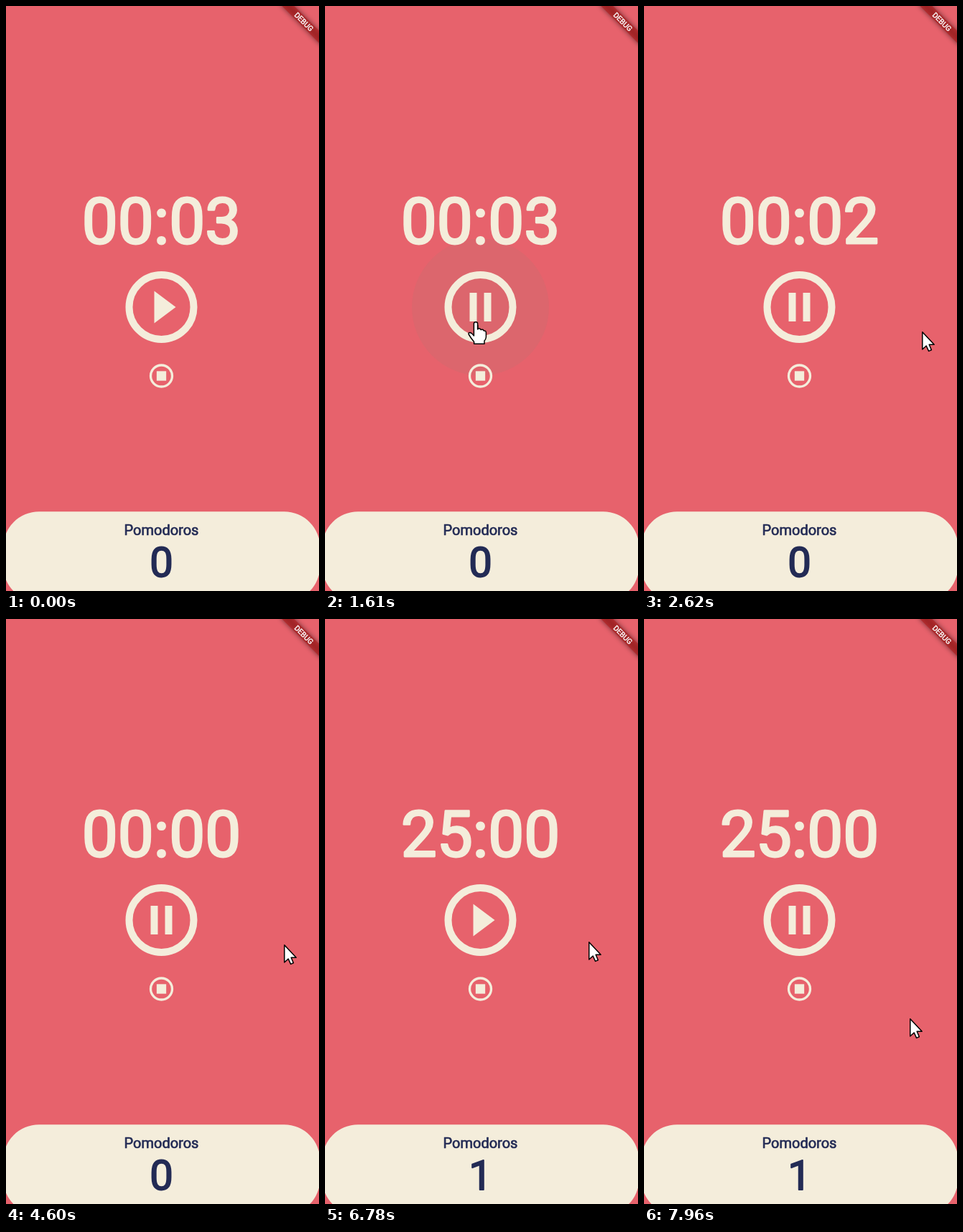
These frames come from a looping animation (436x816 px, 8 s). An HTML page:

```html
<!DOCTYPE html>
<html lang="en">
<head>
<meta charset="utf-8">
<title>Pomodoro timer</title>
<style>
  html, body { margin: 0; width: 100%; height: 100%; overflow: hidden; background: #e7626c; }
  svg { display: block; }
  text { font-family: Roboto, sans-serif; text-anchor: middle; stroke-linejoin: round; }
  .cream { fill: #f4eddb; stroke: #f4eddb; }
  .navy { fill: #232b55; stroke: #232b55; }
  .ring { fill: none; stroke: #f4eddb; stroke-width: 2; }
  .glyph { fill: #f4eddb; }
  .cursor path { fill: #fff; stroke: #000; stroke-width: 1.5; stroke-linejoin: round; }
</style>
</head>
<body>
<svg width="436" height="816" viewBox="0 0 436 816">
  <defs>
    <filter id="blur" x="-30%" y="-150%" width="160%" height="400%"><feGaussianBlur stdDeviation="3.5"/></filter>
  </defs>
  <rect width="436" height="816" fill="#e7626c"/>

  <circle id="hover" cx="216.5" cy="420" r="95.5" fill="#dc666d"/>
  <circle id="splash" fill="#c8c8c8"/>

  <text id="clock" class="cream" x="216.5" y="331.2" font-size="89" stroke-width="2.8">00:03</text>

  <g transform="translate(216.5 420) scale(5)">
    <circle class="ring" r="9"/>
    <path id="play" class="glyph" d="M-2 4.5L4 0L-2-4.5Z"/>
    <path id="pause" class="glyph" d="M-3-4h2v8h-2zM1-4h2v8h-2z"/>
  </g>
  <g transform="translate(216.5 516) scale(1.6667)">
    <circle class="ring" r="9"/>
    <rect class="glyph" x="-4" y="-4" width="8" height="8"/>
  </g>

  <rect x="-4" y="705.3" width="441.5" height="125.7" rx="50" fill="#f4eddb"/>
  <text class="navy" x="216.5" y="738" font-size="20" stroke-width=".7">Pomodoros</text>
  <text id="count" class="navy" x="216.5" y="796.3" font-size="58" stroke-width="1.8">0</text>

  <g transform="translate(439 -2) rotate(45)">
    <rect x="-40" y="28" width="80" height="12" fill="#000" opacity=".5" filter="url(#blur)"/>
    <rect x="-40" y="28" width="80" height="12" fill="#b71c1c" opacity=".63"/>
    <text y="37.6" font-size="10.2" fill="#fff" stroke="#fff" stroke-width=".4">DEBUG</text>
  </g>

  <g id="cursor" class="cursor">
    <path id="arrow" d="M.8.8V25L6.2 20L9.6 27.4L13.4 25.8L10.2 18.3H17.2Z"/>
    <path id="hand" d="M-2.6 3Q-2.6.7 0 .7T2.6 3V11Q3-.0 3 10.5Q6 8.8 7.2 11.6Q10 10.2 11.2 13Q14.4 12.4 14.4 16V22Q14 25 12 27V31.3H-2.4V28.5L-6.6 23L-9.8 18Q-10.6 15.4-7.8 15.4Q-5.6 15.8-2.6 20Z"/>
  </g>
</svg>
<script>
const LOOP = 8000;
const CENTER = [216.5, 420];
const $ = id => document.getElementById(id);
const clamp01 = v => Math.min(1, Math.max(0, v));
const smooth = p => p * p * (3 - 2 * p);
const mix = (a, b, p) => a + (b - a) * p;
const show = (id, on) => $(id).setAttribute("visibility", on ? "visible" : "hidden");

// Bursts of motion: start, end, number of steps.
const bursts = [[240, 990, 11], [1060, 1130, 2], [1540, 2220, 10], [6780, 7060, 5], [7270, 7960, 11]];

// Pointer moves: start, end, from, to.
const moves = [
  [165, 990, [368, 765], [210, 470]],
  [990, 1130, [210, 470], [210, 440]],
  [1610, 2220, [210, 440], [387, 454]],
  [6710, 7060, [387, 454], [196, 419]],
  [7410, 7960, [196, 419], [370, 557]]
];

const taps = [{ time: 1540, at: [210, 440] }, { time: 7270, at: [196, 419] }];

function snap(t) {
  for (const [start, end, steps] of bursts) {
    if (t < start || t > end) continue;
    const step = (end - start) / (steps - 1);
    return start + Math.floor((t - start) / step + 0.03) * step;
  }
  return t;
}

function pointerAt(t) {
  const [start, end, from, to] = moves.filter(m => m[0] <= t).pop() || moves[0];
  const p = smooth(clamp01((t - start) / (end - start)));
  return from.map((v, i) => mix(v, to[i], p));
}

const within = ([x, y], cx, cy, half) => Math.abs(x - cx) <= half && Math.abs(y - cy) <= half;

function drawSplash(t) {
  const tap = taps.find(({ time }) => t > time + 75 && t < time + 290);
  show("splash", tap);
  if (!tap) return;
  const age = t - tap.time;
  const grow = clamp01((age - 70) / 112);
  const splash = $("splash");
  splash.setAttribute("cx", mix(tap.at[0], CENTER[0], grow));
  splash.setAttribute("cy", mix(tap.at[1], CENTER[1], grow));
  splash.setAttribute("r", 95.5 * grow);
  splash.setAttribute("opacity", 0.32 * clamp01((290 - age) / 145));
}

function render(time) {
  const t = snap(time);
  const pos = pointerAt(t);
  const overMain = within(pos, ...CENTER, 68);
  const overStop = within(pos, 216.5, 516, 28);
  const visible = t >= 240;
  const running = (t >= 1540 && t < 5590) || t >= 7270;
  const done = t >= 5590;
  const left = 3 - (t >= 2620) - (t >= 3610) - (t >= 4600);

  $("clock").textContent = done ? "25:00" : "00:0" + left;
  $("count").textContent = done ? 1 : 0;
  show("play", !running);
  show("pause", running);
  show("hover", visible && overMain);
  show("hand", visible && (overMain || overStop));
  show("arrow", visible && !overMain && !overStop);
  $("cursor").setAttribute("transform", `translate(${pos.map(Math.round).join(" ")})`);
  drawSplash(t);
}

const begin = performance.now();
function tick() {
  render((performance.now() - begin) % LOOP);
  requestAnimationFrame(tick);
}
tick();
</script>
</body>
</html>
```
